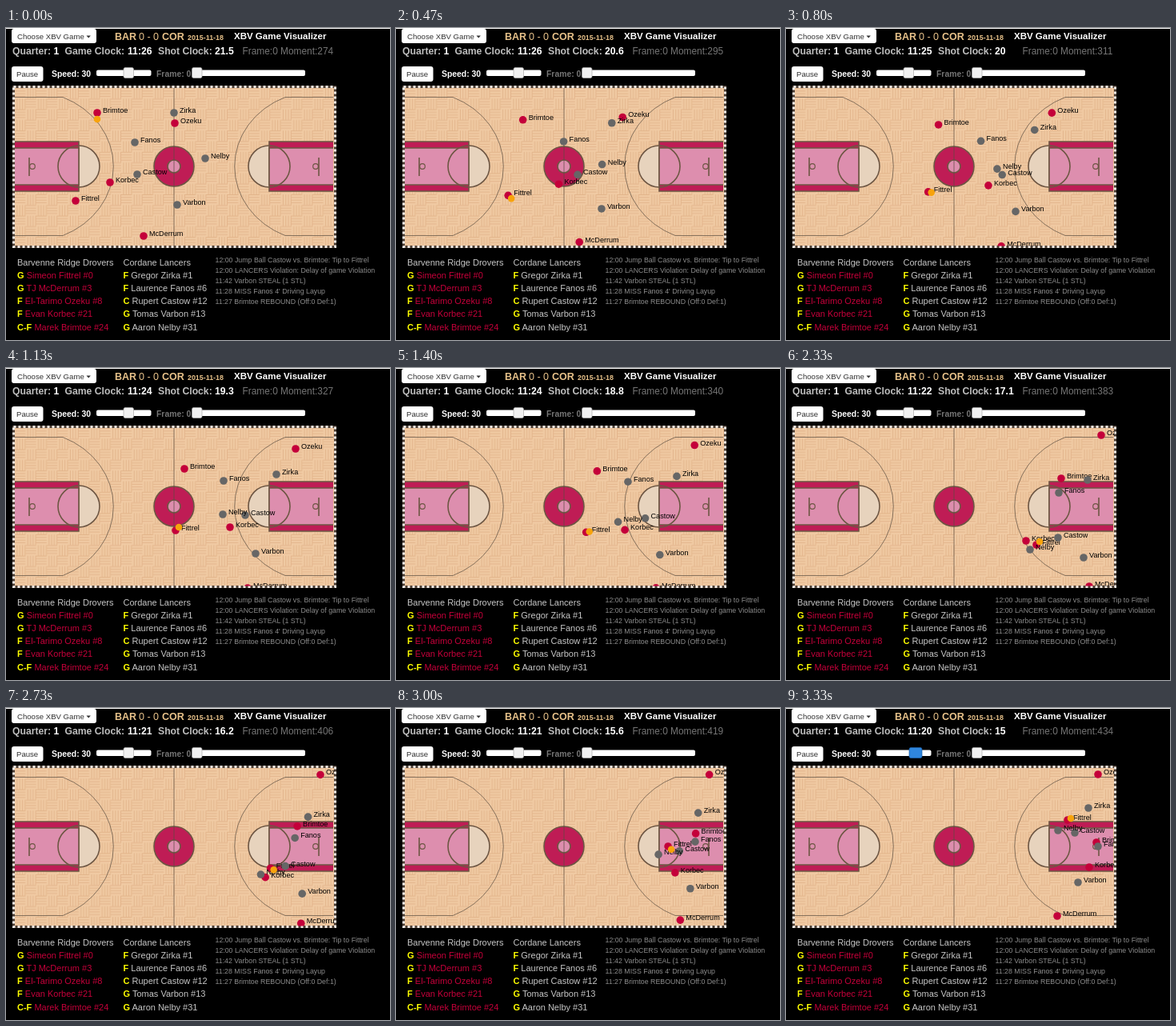
Animation of 480 by 390 pixels, one loop 3400 ms. Source, as an HTML page:

```html
<!DOCTYPE html>
<html lang="en">
<head>
<meta charset="utf-8">
<title>XBV Game Visualizer</title>
<style>
  html, body { margin: 0; width: 100%; height: 100%; overflow: hidden; background: #000; }
  svg { display: block; width: 480px; height: 390px; font-family: "Liberation Sans", Arial, sans-serif; }
  text { white-space: pre; }
  .b { font-weight: bold; }
  .tan { fill: #e8c28a; font-size: 12.5px; }
  .status { fill: #bdbdbd; font-size: 12.2px; }
  .w { fill: #fff; }
  .dim { fill: #757575; }
  .control { font-size: 10.4px; }
  .button { fill: #333; font-size: 9.6px; }
  .roster { fill: #c6c6c6; font-size: 11px; }
  .pos { fill: #ff0; font-weight: bold; }
  .home { fill: #c4003a; }
  .away { fill: #666; }
  .plays { fill: #8c8c8c; font-size: 8.8px; }
  .thumb { fill: #f1f1f1; stroke: #aaa; stroke-width: .7; }
  .thumb.on { fill: #2f86dd; stroke: #1c5fa8; }
  .label { font-size: 9.1px; fill: #000; }
  .line { fill: none; stroke: #5a4c40; stroke-width: .7; }
  .paint { stroke: #6d5643; stroke-width: 1.6; }
</style>
</head>
<body>
<svg viewBox="0 0 480 390">
  <defs>
    <path id="planks" d="M0 .5h13.3m-13.3 3.3h13.3m-13.3 3.3h13.3m-13.3 3.3h13.3" stroke="#dfaf85" stroke-width=".8"/>
    <pattern id="wood" x="11" y="75" width="26.6" height="26.6" patternUnits="userSpaceOnUse">
      <rect width="26.6" height="26.6" fill="#f0caa3"/>
      <use href="#planks"/>
      <use href="#planks" x="13.3" y="13.3"/>
      <use href="#planks" transform="translate(26.6) rotate(90)"/>
      <use href="#planks" transform="translate(13.3 13.3) rotate(90)"/>
    </pattern>
    <clipPath id="inside"><rect x="11" y="75" width="399.5" height="197.5"/></clipPath>
    <g id="end">
      <path class="line" d="M11 86.5H71A104 94 0 0 1 71 259.5H11"/>
      <circle class="paint" cx="91" cy="173" r="26" fill="#e7d3bd"/>
      <path class="paint" d="M11 142H91V204H11" fill="#bf1c55"/>
      <path class="paint" d="M11 150H91V196H11" fill="#dd8eae"/>
      <path class="paint" d="M91 147A26 26 0 0 0 91 199" fill="none"/>
      <path class="paint" d="M29 162V185M29 173h1" fill="none"/>
      <circle class="paint" cx="33" cy="173" r="3.3" fill="none" style="stroke-width:1.2"/>
    </g>
  </defs>
  <rect width="480" height="390"/>
  <rect width="480" height="1" fill="#fff"/>

  <rect x="7" y="1" width="106" height="18" rx="3" fill="#fff"/>
  <text class="button" x="14" y="13.5">Choose XBV Game</text>
  <path d="M100.5 9.5h5.4l-2.7 3z" fill="#333"/>
  <g class="tan b">
    <text x="136" y="14.5">BAR</text>
    <text x="166" y="14.5" font-weight="normal">0 - 0</text>
    <text x="195" y="14.5">COR</text>
    <text x="227" y="14.5" style="font-size:8.9px">2015-11-18</text>
  </g>
  <text class="w b" x="285" y="14" font-size="11.5">XBV Game Visualizer</text>

  <g class="status b">
    <text x="8" y="32.5">Quarter: <tspan class="w">1</tspan></text>
    <text x="73.5" y="32.5">Game Clock:</text>
    <text class="w" x="152" y="32.5" id="clock"></text>
    <text x="190" y="32.5">Shot Clock:</text>
    <text class="w" x="261" y="32.5" id="shot"></text>
  </g>
  <text class="dim" x="295.5" y="32.5" font-size="11.9" id="moment"></text>

  <rect x="7" y="48" width="39.5" height="19" rx="3" fill="#fff"/>
  <text class="button" x="13" y="61">Pause</text>
  <text class="control w b" x="57" y="60.5">Speed: 30</text>
  <text class="control dim b" x="188" y="60.5">Frame: 0</text>
  <rect x="113" y="52.5" width="68.5" height="7.5" rx="2" fill="#fff"/>
  <rect x="233" y="52.5" width="141" height="7.5" rx="2" fill="#fff"/>
  <rect class="thumb" id="speed" x="147" y="49.5" width="12.5" height="13" rx="2"/>
  <rect class="thumb" x="232.5" y="49.5" width="12.5" height="13" rx="2"/>

  <rect x="8" y="72" width="405" height="203" fill="#4a3d33"/>
  <rect x="11" y="75" width="399" height="197" fill="url(#wood)"/>
  <rect x="9.5" y="73.5" width="402" height="200" fill="none" stroke="#f2ece6" stroke-width="3" stroke-dasharray="3 3"/>
  <g clip-path="url(#inside)">
    <use href="#end"/>
    <use href="#end" transform="matrix(-1 0 0 1 420 0)"/>
    <circle class="paint" cx="210" cy="173" r="25" fill="#bf1c55"/>
    <circle class="paint" cx="210" cy="173" r="8" fill="#dd8eae"/>
    <path class="line" d="M210 75V272.5"/>
    <g id="players"></g>
    <circle id="ball" r="4.3" fill="#f7a30c"/>
  </g>

  <g id="info"></g>
</svg>
<script>
const $ = id => document.getElementById(id);
const LOOP = 3400, STEP = 200 / 3, LAST = 50, PRESS = 3130;
const runKeys = [0, 17, 35, LAST];
const feedKeys = [0, 7, 17, 26, 35, 41, LAST];
const feed = [274, 295, 327, 356, 383, 406, 434];

const player = (pos, first, last, num, x, y) => ({ pos, first, last, num, x, y });
const home = [
  player('G', 'Simeon', 'Fittrel', 0, [87, 212, 313, 352], [216, 203, 221, 140]),
  player('G', 'TJ', 'McDerrum', 3, [172, 302, 379, 339], [260, 275, 273, 260]),
  player('F', 'El-Tarimo', 'Ozeku', 8, [211, 362, 394, 390], [119, 101, 84, 83]),
  player('F', 'Evan', 'Korbec', 21, [130, 280, 300, 379], [193, 199, 216, 199]),
  player('C-F', 'Marek', 'Brimtoe', 24, [114, 223, 344, 388], [106, 126, 138, 168])
];
const away = [
  player('F', 'Gregor', 'Zirka', 1, [210, 338, 377, 378], [106, 133, 140, 125]),
  player('F', 'Laurence', 'Fanos', 6, [161, 272, 341, 390], [143, 141, 156, 173]),
  player('C', 'Rupert', 'Castow', 12, [164, 299, 340, 361], [183, 184, 212, 156]),
  player('G', 'Tomas', 'Varbon', 13, [214, 312, 372, 365], [221, 232, 237, 218]),
  player('G', 'Aaron', 'Nelby', 31, [249, 271, 305, 340], [163, 183, 227, 153])
];
const plays = [
  '12:00 Jump Ball Castow vs. Brimtoe: Tip to Fittrel',
  '12:00 LANCERS Violation: Delay of game Violation',
  '11:42 Varbon STEAL (1 STL)',
  "11:28 MISS Fanos 4' Driving Layup",
  '11:27 Brimtoe REBOUND (Off:0 Def:1)'
];

const roster = (x, team, list, cls) =>
  `<text class="roster" x="${x}" y="297">${team}</text>` +
  list.map((p, i) =>
    `<text class="roster" x="${x}" y="${313 + 16.15 * i}"><tspan class="pos">${p.pos}</tspan> ` +
    `<tspan class="${cls}">${p.first} ${p.last} #${p.num}</tspan></text>`).join('');

$('info').innerHTML = roster(14, 'Barvenne Ridge Drovers', home, 'home') +
  roster(146.5, 'Cordane Lancers', away, '') +
  plays.map((p, i) => `<text class="plays" x="261.5" y="${293.3 + 13 * i}">${p}</text>`).join('');

const dots = (list, cls) => list.map(p =>
  `<g><circle class="${cls}" r="4.8"/><text class="label" x="7">${p.last}</text></g>`).join('');
$('players').innerHTML = dots(home, 'home') + dots(away, 'away');
const squad = [...home, ...away];
const [handler] = home, rebounder = home[4];

const place = (el, [x, y]) => el.setAttribute('transform', `translate(${x.toFixed(2)} ${y.toFixed(2)})`);

// Monotone cubic through values v at the given keys
function curve(keys, v, k) {
  const end = keys.length - 1;
  const slope = j => (v[j + 1] - v[j]) / (keys[j + 1] - keys[j]);
  const tangent = j => {
    const a = slope(Math.max(j - 1, 0)), b = slope(Math.min(j, end - 1));
    return a * b <= 0 ? 0 : 2 * a * b / (a + b);
  };
  let i = 0;
  while (i < end - 1 && k >= keys[i + 1]) i++;
  const h = keys[i + 1] - keys[i], u = (k - keys[i]) / h, w = 1 - u;
  return v[i] * (1 + 2 * u) * w * w + v[i + 1] * u * u * (3 - 2 * u) +
    h * u * w * (tangent(i) * w - tangent(i + 1) * u);
}

const spot = (p, k) => [curve(runKeys, p.x, k), curve(runKeys, p.y, k)];

// Outlet pass first, then a dribble beside the handler
function ballAt(k) {
  const pass = Math.min(1, k / 7);
  const [x0, y0] = spot(rebounder, 0), [x1, y1] = spot(handler, k);
  const bounce = 4 * Math.cos((k - 26) * Math.PI / 9);
  return [x0 + (x1 + 4 - x0) * pass, y0 + 8 + (y1 + bounce - y0 - 8) * pass];
}

function stepAt(t) {
  const k = Math.floor(t / STEP) + 1;
  return Math.min(LAST, Math.round(k * STEP / 10) * 10 > t ? k - 1 : k);
}

function draw(t) {
  const k = stepAt(t);
  squad.forEach((p, i) => place($('players').children[i], spot(p, k)));
  place($('ball'), ballAt(k));

  const moment = Math.round(curve(feedKeys, feed, k));
  const shot = 21.452 - (moment - feed[0]) * .04005;
  const game = Math.floor(shot + 665.45);
  $('moment').textContent = 'Frame:0 Moment:' + moment;
  $('shot').textContent = Math.round(shot * 10) / 10;
  $('clock').textContent = Math.floor(game / 60) + ':' + String(game % 60).padStart(2, '0');

  const on = t >= PRESS, thumb = $('speed');
  thumb.classList.toggle('on', on);
  thumb.setAttribute('x', on ? 154 : 147);
  thumb.setAttribute('width', on ? 16 : 12.5);
}

const start = performance.now();
function tick() {
  draw((performance.now() - start) % LOOP);
  requestAnimationFrame(tick);
}
tick();
</script>
</body>
</html>
```
